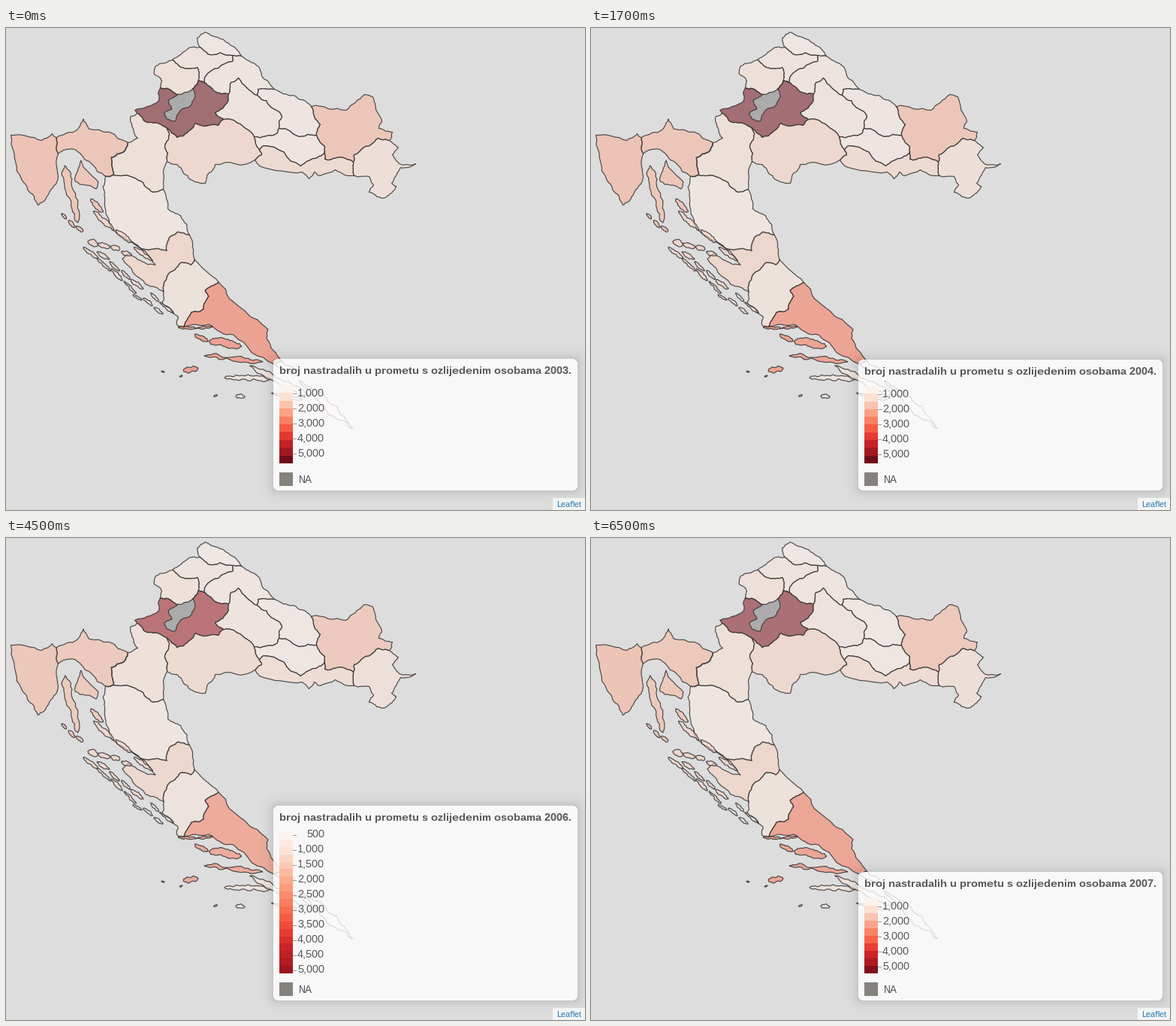
A matplotlib script for the animation above (8 s loop, 771 px wide and 641 px high).

```python
import random

import matplotlib.pyplot as plt
import numpy as np
from matplotlib.animation import ArtistAnimation
from matplotlib.collections import PolyCollection
from matplotlib.colors import LinearSegmentedColormap
from matplotlib.patches import Polygon, Rectangle

W, H, DPI = 771, 641, 100
PX = 72 / DPI
BACK, INK = "#dddddd", "#555555"
EDGE = (0.2, 0.2, 0.2, 0.85)
REDS = LinearSegmentedColormap.from_list("reds", [
    "#fff5f0", "#fee0d2", "#fcbba1", "#fc9272", "#fb6a4a",
    "#ef3b2c", "#cb181d", "#a50f15", "#67000d"])

FIRST_YEAR = 2003
MAXIMA = [5630, 5580, 4760, 5110, 5430]
LOW, BAR_MIN, BAR_BOTTOM, TICK_GAP = 350, 420, 579, 20

# Share of the yearly maximum, in percent
SHARES = dict(me=3, va=8, kr=11, zg=100, ko=6, bj=7, vi=4, po=4, os=28, vu=12,
              br=15, si=17, ka=11, li=5, pr=28, ist=30, za=18, sb=9, sp=50, du=9)

# Hinted glyphs with whole-pixel advances, as a browser sets small text
plt.rcParams.update({"text.hinting": "native", "text.hinting_factor": 1,
                     "font.family": "Liberation Sans"})

rng = random.Random(4)
arcs, islands = {}, {code: [] for code in SHARES}


def rough(points, passes=3, amount=0.12):
    """Break a line into small bends, like a surveyed border."""
    for _ in range(passes):
        out = [points[0]]
        for (x0, y0), (x1, y1) in zip(points, points[1:]):
            k = rng.uniform(-amount, amount)
            out += [((x0 + x1) / 2 - k * (y1 - y0),
                     (y0 + y1) / 2 + k * (x1 - x0)), (x1, y1)]
        points = out
    return points


def arc(name, *points):
    """A border line; its name holds the codes of the counties it bounds."""
    arcs[name] = rough(list(points))


def islet(code, centre, length, width, angle):
    """A ragged oval, tilted by an angle in degrees."""
    t = np.arange(12) * np.pi / 6
    c, s = np.cos(np.radians(angle)), np.sin(np.radians(angle))
    u = length / 2 * np.cos(t)
    v = width / 2 * np.sin(t) * [rng.uniform(0.6, 1.2) for _ in t]
    ring = list(zip(centre[0] + u * c - v * s, centre[1] + u * s + v * c))
    islands[code].append(rough(ring + ring[:1], 2, 0.18))


def island_row(code, start, end, count, width):
    """Long islands in a row, each pointing along it."""
    dx, dy = end[0] - start[0], end[1] - start[1]
    spacing = np.hypot(dx, dy) / count
    for i in range(count):
        f = (i + 0.5) / count
        islet(code, (start[0] + f * dx, start[1] + f * dy + rng.uniform(-2, 2)),
              spacing * rng.uniform(0.7, 1.1), width * rng.uniform(0.7, 1.2),
              np.degrees(np.arctan2(dy, dx)) + rng.uniform(-8, 8))


def gap(a, b):
    return (a[0] - b[0]) ** 2 + (a[1] - b[1]) ** 2


def county_ring(code):
    """Chain all arcs of a county end to end."""
    left = [line for name, line in arcs.items() if code in name.split("_")]
    ring = list(left.pop(0))
    while left:
        end = ring[-1]
        line = min(left, key=lambda a: min(gap(end, a[0]), gap(end, a[-1])))
        left.remove(line)
        ring += line if gap(end, line[0]) <= gap(end, line[-1]) else line[::-1]
    return ring


# North
arc("me", (258, 25), (254, 13), (265, 5), (296, 20), (313, 37))
arc("me_va", (258, 25), (268, 34), (301, 36))
arc("me_ko", (301, 36), (313, 37))
arc("va", (221, 42), (243, 26), (258, 25))
arc("kr_va", (221, 42), (230, 50), (254, 52), (256, 69))
arc("va_zg", (256, 69), (264, 72))
arc("va_ko", (264, 72), (265, 64), (301, 44), (301, 36))
arc("kr", (205, 79), (207, 70), (197, 61), (199, 50), (221, 42))
arc("kr_zg", (205, 79), (215, 80), (229, 88), (249, 80), (256, 69))
arc("zg", (174, 113), (171, 109), (203, 96), (205, 79))
arc("ko_zg", (264, 72), (278, 84), (296, 87))
arc("bj_zg", (296, 87), (295, 97), (278, 112), (289, 121))
arc("si_zg", (289, 121), (282, 129), (252, 126), (236, 143), (227, 145), (213, 132))
arc("ka_zg", (213, 132), (185, 124), (174, 113))
arc("ko", (313, 37), (338, 55), (342, 66), (357, 81))
arc("bj_ko", (296, 87), (299, 72), (309, 66), (334, 89))
arc("ko_vi", (334, 89), (335, 81), (357, 81))

# East
arc("bj_vi", (334, 89), (356, 107), (367, 116), (363, 133))
arc("bj_po", (363, 133), (361, 139), (330, 144))
arc("bj_si", (330, 144), (304, 123), (289, 121))
arc("vi", (357, 81), (382, 89), (406, 104))
arc("os_vi", (406, 104), (418, 128), (413, 142))
arc("po_vi", (363, 133), (371, 133), (390, 144), (413, 142))
arc("os_po", (413, 142), (424, 157), (424, 164))
arc("br_po", (424, 164), (414, 172), (392, 183), (342, 156), (337, 162))
arc("po_si", (330, 144), (337, 162))
arc("br_si", (337, 162), (340, 168), (331, 175))
arc("br_os", (424, 164), (424, 174), (440, 172), (462, 178))
arc("os_vu", (462, 178), (463, 168), (485, 155), (495, 146), (510, 149))
arc("br_vu", (462, 178), (463, 196))
arc("os", (406, 104), (452, 109), (477, 88), (488, 91), (500, 124), (496, 133),
    (514, 138), (510, 149))
arc("vu", (510, 149), (522, 158), (514, 168), (523, 180), (545, 180), (525, 185),
    (513, 206), (519, 210), (505, 225), (483, 218), (489, 208), (483, 197), (463, 196))
arc("br", (463, 196), (438, 188), (418, 196), (410, 191), (403, 200), (394, 191),
    (337, 183), (331, 175))

# Centre
arc("si", (331, 175), (278, 181), (265, 206), (256, 205), (236, 193), (227, 181), (214, 177))
arc("ka_si", (213, 132), (217, 141), (211, 156), (214, 177))
arc("ka", (214, 177), (209, 214))
arc("ka_li", (209, 214), (193, 217), (168, 198), (143, 195))
arc("ka_pr", (143, 195), (140, 172), (157, 164), (162, 152))
arc("ka_west", (162, 152), (175, 146), (167, 129), (166, 117), (174, 113))
arc("li_pr", (143, 195), (132, 197))
arc("li", (209, 214), (215, 240), (232, 249), (244, 275))
arc("li_za", (244, 275), (229, 271), (217, 279), (214, 296), (190, 295), (167, 284))
arc("li_sea", (167, 284), (137, 259), (131, 225), (132, 197))

# Coast
arc("ist_pr", (67, 146), (69, 167))
arc("ist", (67, 146), (61, 140), (47, 149), (6, 142), (14, 190), (28, 214), (42, 235),
    (50, 230), (66, 207), (69, 167))
arc("pr", (67, 146), (95, 135), (103, 121), (110, 134), (162, 152))
arc("pr_sea", (132, 197), (98, 166), (86, 161), (69, 167))
arc("za", (244, 275), (251, 308))
arc("sb_za", (251, 308), (246, 315), (233, 312), (215, 329), (210, 351))
arc("za_sea", (210, 351), (186, 341), (155, 307), (163, 300), (188, 314), (199, 315),
    (167, 284))
arc("sb", (251, 308), (283, 338))
arc("sb_sp", (283, 338), (265, 349), (270, 357), (263, 374), (247, 378), (236, 398))
arc("sb_sea", (236, 398), (228, 395), (229, 384), (208, 366), (210, 351))
arc("sp", (283, 338), (318, 376), (349, 401), (347, 413), (367, 443))
arc("du_sp", (367, 443), (357, 447))
arc("sp_sea", (357, 447), (303, 408), (270, 394), (236, 398))
arc("du", (367, 443), (384, 453), (382, 461))
arc("du_sea", (382, 461), (357, 447))

# Islands
krk = [(100, 176), (123, 205), (120, 214), (92, 204), (100, 176)]
islands["pr"].append(rough(krk))
islet("pr", (87, 221), 78, 12, 77)
islet("pr", (121, 236), 24, 7, 47)
island_row("pr", (72, 246), (103, 273), 3, 5)
island_row("za", (117, 243), (196, 312), 3, 6)
island_row("za", (108, 284), (168, 300), 4, 8)
island_row("za", (122, 297), (182, 346), 4, 5)
island_row("za", (104, 290), (174, 352), 4, 5)
island_row("sb", (168, 352), (210, 380), 3, 4)
island_row("sb", (190, 350), (222, 379), 2, 4)
island_row("sp", (230, 398), (276, 396), 2, 4)
islet("sp", (260, 412), 20, 6, 28)
islet("sp", (292, 420), 44, 12, 8)
islet("sp", (303, 440), 78, 7, 6)
islet("sp", (246, 454), 20, 8, -10)
islet("sp", (209, 457), 4, 2, 20)
islet("sp", (233, 463), 4, 2, -20)
islet("du", (322, 466), 62, 9, 2)
islet("du", (364, 469), 88, 7, 27)
islet("du", (426, 501), 96, 9, 42)
islet("du", (374, 490), 42, 4, 12)
islet("du", (312, 490), 12, 6, 5)
islet("du", (279, 489), 5, 2, -20)

rings = {code: [county_ring(code)] + islands[code] for code in SHARES}
capital = arcs["kr_zg"][16:25] + rough([
    (249, 80), (252, 90), (247, 102), (236, 107), (225, 124), (214, 121),
    (211, 113), (221, 108), (216, 96), (229, 88)])

fig = plt.figure(figsize=(W / DPI, H / DPI), dpi=DPI, facecolor=BACK)
ax = fig.add_axes([0, 0, 1, 1])
ax.axis("off")


def scale(value):
    return np.clip((value - LOW) / (MAXIMA[0] - LOW), 0, 1)


def label(x, y, text, size=14, color=INK, **kw):
    return ax.text(x, y, text, fontsize=size * PX, color=color, zorder=6, **kw)


def panel(top, left=356, right=761, bottom=615, radius=5):
    """Translucent white box with round corners and a soft shadow outside."""
    y, x = np.mgrid[0:H, 0:W] + 0.5
    dx = abs(x - (left + right) / 2) - (right - left) / 2 + radius
    dy = abs(y - (top + bottom) / 2) - (bottom - top) / 2 + radius
    dist = (np.hypot(np.maximum(dx, 0), np.maximum(dy, 0))
            + np.minimum(np.maximum(dx, dy), 0) - radius)
    inside = np.clip(0.5 - dist, 0, 1)
    shadow = 0.1 * (1 - np.tanh(0.8 * dist / 7.5))
    rgba = np.repeat(inside[..., None], 4, axis=2)
    rgba[..., 3] = 0.8 * inside + shadow * (1 - inside)
    return ax.imshow(rgba, extent=(0, W, H, 0), aspect="auto", zorder=4,
                     interpolation="nearest")


def legend(year, top_value):
    """Panel, colour bar and ticks; the bar grows with the yearly maximum."""
    step = 1000 if top_value > 5200 else 500

    def y_of(value):
        return BAR_BOTTOM - (top_value - value) / step * TICK_GAP

    bar_top = round(y_of(BAR_MIN))
    panel_top = bar_top - 35
    bands = round((BAR_BOTTOM - bar_top) / 10)
    values = np.linspace(BAR_MIN, top_value, bands)
    bar = ax.imshow(REDS(scale(values), alpha=0.95)[:, None], aspect="auto",
                    extent=(364, 382, BAR_BOTTOM, bar_top), zorder=5,
                    interpolation="nearest")
    artists = [panel(panel_top), bar, label(
        364, panel_top + 20, "broj nastradalih u prometu s ozlijedenim "
        f"osobama {year}.", weight="bold")]
    for value in range(step, top_value, step):
        y = y_of(value)
        artists += ax.plot([382, 386], [y, y], color="#999999", lw=PX, zorder=5)
        artists.append(label(424, y + 3.3, f"{value:,}", ha="right"))
    return artists


def draw_year(index):
    top_value = MAXIMA[index]
    counties = [ax.add_collection(PolyCollection(
        shapes, facecolors=[REDS(SHARES[code] / 100 * scale(top_value), alpha=0.5)],
        edgecolors=[EDGE], linewidths=1.2 * PX, zorder=2), autolim=False)
        for code, shapes in rings.items()]
    return counties + legend(FIRST_YEAR + index, top_value)


years = [draw_year(i) for i in range(len(MAXIMA))]

# Parts that never change
ax.add_patch(Polygon(capital, fc="#ababab", ec=EDGE, lw=1.2 * PX, zorder=3))
ax.add_patch(Rectangle((364, 591), 18, 18, fc="#85817d", lw=0, zorder=5))
label(390, 605, "NA")
ax.add_patch(Rectangle((728, 625), 43, 16, fc=(1, 1, 1, 0.7), lw=0, zorder=5))
label(733, 637, "Leaflet", 11, "#1f78b4")
ax.set(xlim=(0, W), ylim=(H, 0))

# Half-second slots: each year holds four, cut short at both ends of the loop
schedule = [(slot + 3) // 4 for slot in range(16)]
anim = ArtistAnimation(fig, [years[i] for i in schedule], interval=500,
                       repeat=True, repeat_delay=0)
plt.show()
```
